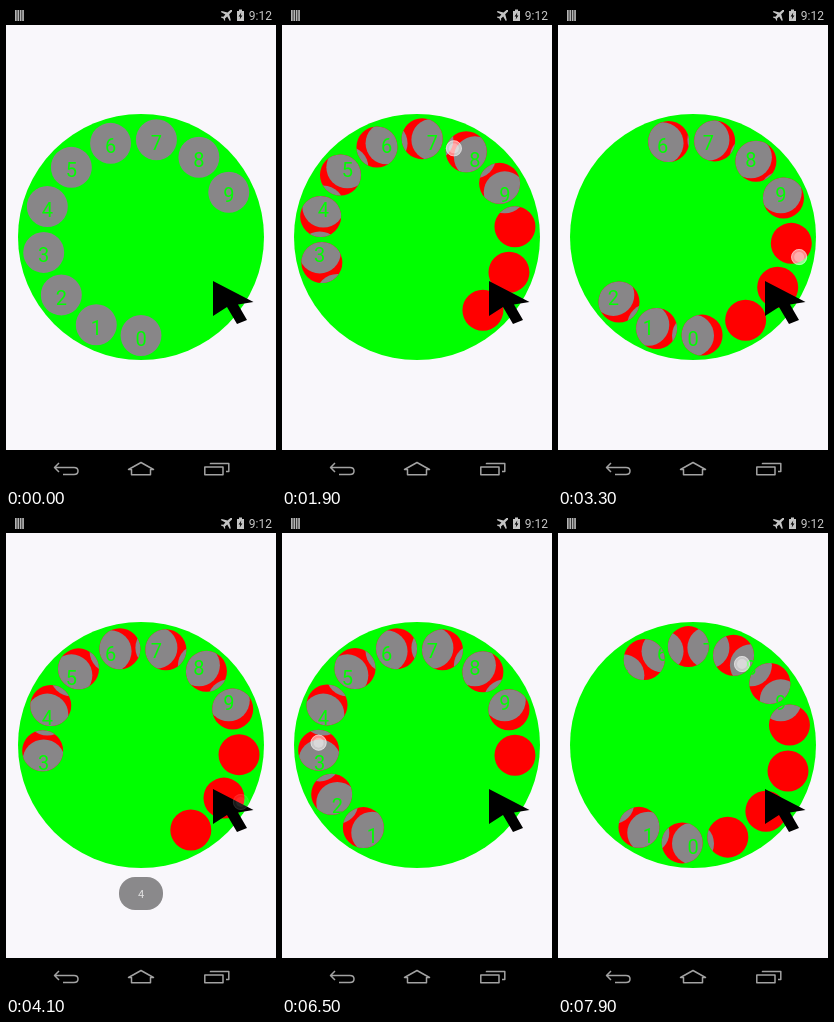
Write an HTML page with a canvas that moves like this. It is 270x480 px and loops after 8000 ms.

```html
<!DOCTYPE html>
<html lang="en">
<head>
<meta charset="utf-8">
<title>Rotary dial</title>
<style>
  html, body { margin: 0; width: 100%; height: 100%; overflow: hidden; background: #000; }
  canvas { display: block; width: 270px; height: 480px; }
</style>
</head>
<body>
<canvas id="stage"></canvas>
<script>
const W = 270, H = 480, LOOP = 8000, STEP = 200, FIRST = 500;
const CX = 135, CY = 231, DISC = 123, RING = 98.5, HOLE = 20.5, GAP = 27;
const GREEN = '#00ff00', RED = '#ff0000', GREY = '#888688';
const FONT = 'Roboto, "Noto Sans", sans-serif';

const canvas = document.getElementById('stage');
const dpr = window.devicePixelRatio || 1;
canvas.width = W * dpr;
canvas.height = H * dpr;
const ctx = canvas.getContext('2d');
ctx.scale(dpr, dpr);

// Each key: time, finger angle, finger radius, dial rotation (degrees clockwise from below)
const drags = [
  [[500, 106, 95, 0], [1900, 202.6, 96, 75], [3300, 280.7, 108, 165.7], [3800, 299.7, 115, 188]],
  [[5700, 50.6, 94.5, 0], [7100, 141.4, 101, 76.5], [7900, 211.2, 94.6, 150.3], [8700, 270, 100, 215]]
];
const RELEASE = 3800, BACK = 850;

const clamp = x => Math.max(0, Math.min(1, x));

// Smooth curve through the keys, at rest at both ends
function sample(keys, t, col) {
  const n = keys.length - 1;
  if (t <= keys[0][0]) return keys[0][col];
  if (t >= keys[n][0]) return keys[n][col];
  let i = 0;
  while (t > keys[i + 1][0]) i++;
  const slope = k => k === 0 || k === n ? 0
    : (keys[k + 1][col] - keys[k - 1][col]) / (keys[k + 1][0] - keys[k - 1][0]);
  const a = keys[i], b = keys[i + 1], d = b[0] - a[0], u = (t - a[0]) / d, v = 1 - u;
  return v * v * (1 + 2 * u) * a[col] + u * u * (3 - 2 * u) * b[col]
    + d * u * v * (v * slope(i) - u * slope(i + 1));
}

function polar(deg, r) {
  const a = deg * Math.PI / 180;
  return [CX - Math.sin(a) * r, CY + Math.cos(a) * r];
}

function circle(x, y, r, color) {
  ctx.beginPath();
  ctx.arc(x, y, r, 0, Math.PI * 2);
  if (color) { ctx.fillStyle = color; ctx.fill(); }
}

function rect(x, y, w, h, color) {
  ctx.fillStyle = color;
  ctx.fillRect(x, y, w, h);
}

function text(str, x, y, size, color, align = 'center') {
  ctx.font = size + 'px ' + FONT;
  ctx.textAlign = align;
  ctx.fillStyle = color;
  ctx.fillText(str, x, y);
}

function shape(d, color, width) {
  const p = new Path2D(d);
  if (width) {
    ctx.lineWidth = width;
    ctx.strokeStyle = color;
    ctx.stroke(p);
  } else {
    ctx.fillStyle = color;
    ctx.fill(p);
  }
}

function drawBars() {
  rect(0, 0, W, 19, '#000');
  rect(0, 444, W, 36, '#000');
  for (let i = 0; i < 4; i++) rect(9 + i * 2.4, 4, 1.7, 11, '#b4b4b4');
  shape('M226 4L224.5 4L221.5 6.6L215.6 5L214.8 6L219.4 8.6L217.4 10.8L215.4 10.6L215 11.4L217.4 12.4L218.4 14.8L219.2 14.4L219 12.4L221.2 10.4L223.8 15L224.8 14.2L223.2 8.3L226 5.4Z', '#c4c4c4');
  shape('M231 5H233V3.5H236V5H238V15H231Z', '#c4c4c4');
  shape('M235.3 6.5L232.6 10.4H234.3L233.7 13.5L236.4 9.4H234.7Z', '#000');
  text('9:12', 266, 14, 12, '#c8c8c8', 'right');

  ctx.lineJoin = 'round';
  const line = '#a2a2a2';
  shape('M53 457L48.5 461.5L53 466M49 461.5H68Q72 461.5 72 465T68 468.5H57', line, 1.5);
  shape('M135 456.5L122.5 463.5H125.5V468.7H144.5V463.5H147.5Z', line, 1.5);
  shape('M198.8 461H217V468.7H198.8ZM204.5 458.2V457.6H222.8V465.5H220', line, 1.5);
}

function drawDial(rot) {
  circle(CX, CY, DISC, GREEN);
  ctx.save();
  ctx.beginPath();
  for (let i = 0; i < 10; i++) {
    const [x, y] = polar(i * GAP + rot, RING);
    ctx.moveTo(x + HOLE, y);
    ctx.arc(x, y, HOLE, 0, Math.PI * 2);
  }
  ctx.clip();
  if (rot) rect(0, 100, W, 260, RED);
  const spots = Array.from({ length: 10 }, (_, i) => polar(i * GAP, RING));
  spots.forEach(([x, y]) => circle(x, y, HOLE + 0.5, GREY));
  spots.forEach(([x, y], i) => text(i, x, y + 10, 20, GREEN));
  ctx.restore();
}

function drawFinger(x, y, alpha) {
  ctx.globalAlpha = alpha;
  circle(x, y, 8, 'rgba(255,255,255,.55)');
  circle(x, y, 5, 'rgba(255,255,255,.3)');
  circle(x, y, 7.6);
  ctx.lineWidth = 0.8;
  ctx.strokeStyle = 'rgba(255,255,255,.5)';
  ctx.stroke();
  ctx.globalAlpha = 1;
}

function drawToast(alpha) {
  ctx.globalAlpha = alpha;
  ctx.beginPath();
  ctx.roundRect(113, 363, 44, 33, 16);
  ctx.fillStyle = '#666566';
  ctx.fill();
  text('4', 135, 384, 11, '#fff');
  ctx.globalAlpha = 1;
}

function draw(t) {
  const keys = drags[t < 5000 ? 0 : 1];
  let rot = sample(keys, t, 3);
  if (t > RELEASE && t < 5000) rot *= Math.pow(1 - clamp((t - RELEASE) / BACK), 1.78);

  rect(0, 0, W, H, '#f9f7fb');
  drawBars();
  drawDial(rot);
  shape('M207 275L247.5 296L232 298.5L241 314L231 318L221 301L207 310Z', '#000');

  const toast = Math.min(clamp((t - 3800) / 400), 1 - clamp((t - 5800) / 500));
  if (toast > 0) drawToast(toast);

  const touch = t < 5000 ? 1 - clamp((t - 3750) / 430) : 1;
  if (t >= FIRST && touch > 0) {
    const [x, y] = polar(sample(keys, t, 1), sample(keys, t, 2));
    drawFinger(x, y, touch);
  }
}

function tick() {
  const t = performance.now() % LOOP;
  draw(t < FIRST ? 0 : FIRST + Math.floor((t - FIRST) / STEP) * STEP);
  requestAnimationFrame(tick);
}
tick();
</script>
</body>
</html>
```
